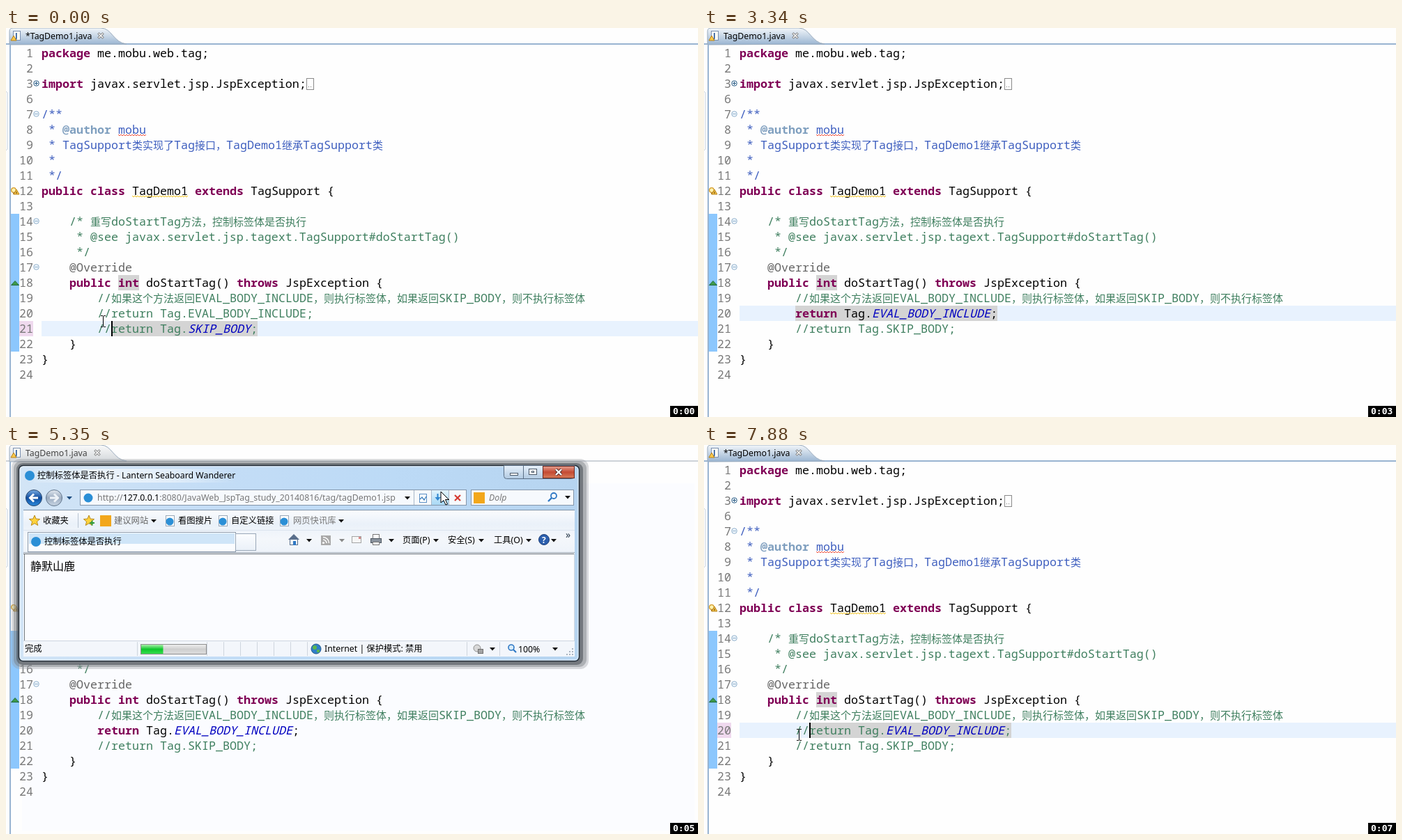
Write an HTML page with a canvas that moves like this. It is 993x559 px and loops after 8 s.

```html
<!DOCTYPE html>
<html lang="zh">
<head>
<meta charset="utf-8">
<title>TagDemo1</title>
<style>
html, body { margin: 0; width: 100%; height: 100%; overflow: hidden; background: #fefefe; }
canvas { display: block; }
</style>
</head>
<body>
<canvas id="stage" width="993" height="559"></canvas>
<script>
const c = document.getElementById('stage').getContext('2d');
const UI = '"Noto Sans", "Noto Sans CJK SC", sans-serif';
const MONO = '"Noto Sans Mono", monospace';
const CJK = '"Noto Sans CJK SC", "Noto Sans CJK", sans-serif';

// style letter -> [colour, font prefix]
const STYLES = {
  k: ['#7f0055', 'bold '], n: ['#000', ''], j: ['#3f5fbf', ''], t: ['#7f9fbf', 'bold '],
  g: ['#3f7f5f', ''], a: ['#646464', ''], i: ['#0000c0', 'italic ']
};
// each segment starts with its style letter
const LINES = {
  1: 'kpackage|n me.mobu.web.tag;',
  2: '',
  3: 'kimport|n javax.servlet.jsp.JspException;',
  6: '',
  7: 'j/**',
  8: 'j * |t@author|j mobu',
  9: 'j * TagSupport类实现了Tag接口，TagDemo1继承TagSupport类',
  10: 'j *',
  11: 'j */',
  12: 'kpublic class|n TagDemo1 |kextends|n TagSupport {',
  13: '',
  14: 'g    /* 重写doStartTag方法，控制标签体是否执行',
  15: 'g     * @see javax.servlet.jsp.tagext.TagSupport#doStartTag()',
  16: 'g     */',
  17: 'a    @Override',
  18: 'k    public int|n doStartTag() |kthrows|n JspException {',
  19: 'g        //如果这个方法返回EVAL_BODY_INCLUDE，则执行标签体，如果返回SKIP_BODY，则不执行标签体',
  22: 'n    }',
  23: 'n}',
  24: ''
};

const rowTop = n => 25 + 22 * (n > 3 ? n - 3 : n - 1);
const within = (t, a, b) => t >= a && t < b;
// value of the last [time, value] entry already reached
const at = (t, steps) => steps.filter(s => s[0] <= t).pop()[1];

function box(x, y, w, h, fill, line) {
  if (fill) { c.fillStyle = fill; c.fillRect(x, y, w, h); }
  if (line) { c.strokeStyle = line; c.lineWidth = 1; c.strokeRect(x + .5, y + .5, w - 1, h - 1); }
}
function round(x, y, w, h, r, fill, line, width = 1) {
  c.beginPath();
  c.roundRect(x, y, w, h, r);
  if (fill) { c.fillStyle = fill; c.fill(); }
  if (line) { c.strokeStyle = line; c.lineWidth = width; c.stroke(); }
}
function poly(pts, fill, line, width = 1) {
  c.beginPath();
  for (let i = 0; i < pts.length; i += 2) c.lineTo(pts[i], pts[i + 1]);
  if (fill) { c.closePath(); c.fillStyle = fill; c.fill(); }
  if (line) { c.strokeStyle = line; c.lineWidth = width; c.stroke(); }
}
function disc(x, y, r, fill, line, width = 1) {
  c.beginPath();
  c.arc(x, y, r, 0, 7);
  if (fill) { c.fillStyle = fill; c.fill(); }
  if (line) { c.strokeStyle = line; c.lineWidth = width; c.stroke(); }
}
function fade(x0, y0, x1, y1, ...colors) {
  const g = c.createLinearGradient(x0, y0, x1, y1);
  colors.forEach((col, i) => g.addColorStop(i / (colors.length - 1), col));
  return g;
}
function label(str, x, y, fill = '#000', font = '12.3px ' + UI) {
  c.font = font;
  c.fillStyle = fill;
  c.fillText(str, x, y);
}
const down = (x, y, col = '#111') => poly([x - 4, y - 2, x + 4, y - 2, x, y + 2.5], col);
function cross(x, y, r, col, width) {
  poly([x - r, y - r, x + r, y + r], null, col, width);
  poly([x - r, y + r, x + r, y - r], null, col, width);
}
function squiggle(x0, x1, y, col) {
  const pts = [];
  for (let x = x0; x <= x1; x += 2) pts.push(x, y + (x - x0) % 4);
  poly(pts, null, col);
}
function star(x, y, r) {
  const pts = [];
  for (let i = 0; i < 10; i++) {
    const a = i * Math.PI / 5, d = i % 2 ? r * .45 : r;
    pts.push(x + d * Math.sin(a), y - d * Math.cos(a));
  }
  poly(pts, '#ffd23c');
  poly([...pts, pts[0], pts[1]], null, '#b98a1a');
}

function codeLine(n, text) {
  let x = 51;
  if (!text) return;
  for (const seg of text.split('|')) {
    const [col, prefix] = STYLES[seg[0]];
    for (const part of seg.slice(1).match(/[\u3000-\uffff]+|[^\u3000-\uffff]+/g) || []) {
      const wide = part[0] >= '\u3000';
      label(part, x, rowTop(n) + 17, col, prefix + (wide ? '15px ' + CJK : '16.667px ' + MONO));
      x += part.length * (wide ? 15 : 10);
    }
  }
}

function bulb(y, error) {
  disc(11, y - 1, 3.3, '#fff3b0', '#d49a28', 1.3);
  box(10, y + 2, 3, 3, '#b98a3c');
  if (error) {
    box(12, y - 3, 7, 8, '#e0343c');
    cross(15.5, y + 1, 1.8, '#fff', 1.2);
  } else {
    poly([15, y - 2, 19, y + 5, 11, y + 5], '#fbc94a', '#b5811c');
    box(14.5, y + 1, 1, 3, '#5a3c00');
  }
}

function tab(active, dirty) {
  box(0, 22, 993, 2, active ? '#99b4d1' : '#cdd2d8');
  c.beginPath();
  c.moveTo(5, 24);
  c.lineTo(5, 5);
  c.quadraticCurveTo(5, 0, 10, 0);
  c.lineTo(136, 0);
  c.bezierCurveTo(152, 0, 154, 21, 173, 23);
  c.closePath();
  c.fillStyle = active ? fade(0, 0, 0, 24, '#f2f6fa', '#99b4d1') : fade(0, 0, 0, 24, '#fafafa', '#d2d6da');
  c.fill();
  c.strokeStyle = '#9aabbd';
  c.lineWidth = 1;
  c.stroke();
  box(5, 24, 2, 535, '#99b4d1');
  box(10, 4, 11, 14, '#fdfdf6', '#7a8fb0');
  label('J', 13, 15, '#2a5a9c', 'bold 11px ' + UI);
  poly([11, 11, 15, 18, 7, 18], '#fbc94a', '#b5811c');
  label((dirty ? '*' : '') + 'TagDemo1.java', 28, 16, active ? '#000' : '#444');
  const x = dirty ? 136 : 131;
  cross(x, 11, 3.6, '#777', 3.2);
  cross(x, 11, 3.2, '#fff', 1.4);
}

function editor(t, browsing) {
  const prefix = at(t, [[0, '//'], [2040, '/'], [2140, ''], [7340, '/'], [7480, '//']]);
  const row = at(t, [[0, 21], [250, 20], [4900, 0], [6400, 18], [7090, 20]]);
  const broken = within(t, 820, 2540);
  const marked = within(t, 2690, 3740) || t >= 7220;
  const left = 131 + 10 * prefix.length;

  box(0, 0, 993, 559, '#fefefe');
  if (within(t, 4900, 6400)) box(23, 55, 965, 499, '#fbfcff');
  tab(!browsing, t < 2540 || t >= 7340);
  poly([0, 91, 2, 93, 2, 174, 0, 176], null, '#c8d2dc');
  box(7, 267, 12, 198, '#8cc7fd');

  if (row) box(51, rowTop(row), 942, 22, '#e8f2fe');
  if (t < 3090) box(19, 421, 20, 22, '#efd9ee');
  if (within(t, 2040, 3090) || t >= 7340) box(19, 399, 20, 22, '#efd9ee');
  const gray = (n, x, w) => box(x, rowTop(n), w, 22, '#d4d4d4');
  if (t < 820 || marked) gray(18, 161, 30);
  if (t < 250) gray(21, 151, 210);
  if (marked) gray(20, left, 290);
  if (within(t, 6550, 7220)) gray(18, 201, 100);

  const comment = t < 2040 || t >= 7480;
  const word = comment ? 'g' : 'k', plain = comment ? 'g' : 'n';
  const constant = at(t, [[0, 'g'], [2040, 'n'], [2690, 'i']]);
  const all = {
    ...LINES,
    20: `${plain}        ${prefix}|${word}return|${plain} Tag.|${constant}EVAL_BODY_INCLUDE|${plain};`,
    21: `g        //return Tag.|${t < 250 ? 'i' : 'g'}SKIP_BODY|g;`
  };
  for (const n in all) {
    label(n, 39 - 10 * n.length, rowTop(+n) + 17, '#787878', '16.667px ' + MONO);
    codeLine(+n, all[n]);
  }

  for (const n of [3, 7, 14, 17]) {
    const y = rowTop(n) + 10.5, col = n == 3 ? '#2f5f86' : '#8fb0cc';
    disc(43.5, y, 3.8, '#eef5fb', col);
    box(41, y - .5, 5, 1, col);
    if (n == 3) box(43, y - 2.5, 1, 5, col);
  }
  box(431, 72, 11, 17, null, '#8a8a8a');
  box(434, 84, 1, 1, '#777');
  box(437, 84, 1, 1, '#777');

  squiggle(161, 201, 153, '#f0523c');
  squiggle(181, 261, 241, '#f0c21e');
  bulb(234);
  if (broken) {
    bulb(80);
    bulb(366, true);
    squiggle(201, 521, 373, '#e0308a');
  } else {
    poly([7.5, 369.5, 13, 363.5, 18.5, 369.5], '#3f9a4c', '#1f6a38');
  }

  const caret = at(t, [[0, 1], [250, 0], [540, 1], [1060, 0], [1490, 1], [2540, 0], [2970, 1], [3340, 0], [7220, 1]]);
  if (caret) box(row == 21 ? 151 : left, rowTop(row), 2, 22, '#000');
}

function frame() {
  // soft outer edge, then the dark core of the shadow
  round(8, 20, 828, 302, 12, 'rgba(150,153,158,.35)');
  round(11, 23, 822, 296, 11, 'rgba(120,124,130,.45)');
  round(15, 26, 813, 290, 9, 'rgba(70,75,82,.55)');
  round(18, 29, 805, 282, 7, fade(18, 29, 823, 90, '#d3e5f6', '#c4ddf6', '#bcdaf6', '#b6d4f0'));
  round(18.5, 29.5, 804, 281, 6, null, '#232c36', 1.6);
  round(20, 31, 801, 278, 5, null, 'rgba(255,255,255,.7)');

  box(40, 34, 290, 20, fade(40, 0, 330, 0, 'rgba(255,255,255,.1)', 'rgba(255,255,255,.6)', 'rgba(255,255,255,.5)', 'rgba(255,255,255,0)'));
  disc(34, 44, 7, '#2b8fd6');
  label('控制标签体是否执行 - Lantern Seaboard Wanderer', 45, 48);

  round(714.5, 29.5, 101, 19, [0, 0, 4, 4], fade(0, 30, 0, 48, '#e6f0fa', '#b3cbe2'), '#5b6f85');
  box(770, 30, 46, 18, fade(0, 30, 0, 48, '#e8a596', '#c44a33', '#d9805c'), '#6b2b22');
  box(742, 30, 1, 18, '#5b6f85');
  box(723, 40, 12, 4, '#fff', '#4a5868');
  box(750, 34, 12, 9, '#fff', '#4a5868');
  box(754, 37, 4, 3, null, '#4a5868');
  cross(793, 39, 4, '#4a2a2a', 4);
  cross(793, 39, 4, '#fff', 2.4);
}

function addressRow(hover) {
  disc(40, 76, 11.5, fade(0, 64, 0, 88, '#7fb2e6', '#0f4c9e', '#2f8fe0'), '#28456b');
  poly([46, 76, 35, 76], null, '#fff', 3);
  poly([40, 70.5, 34.5, 76, 40, 81.5], null, '#fff', 3);
  disc(69, 76, 11.5, fade(0, 64, 0, 88, '#e6ecf2', '#9aabc0', '#cbd8e6'), '#60758c');
  poly([63, 76, 74, 76], null, '#eef3f8', 3);
  poly([69, 70.5, 74.5, 76, 69, 81.5], null, '#eef3f8', 3);
  down(91, 76, '#1d4d80');

  box(106, 64, 555, 23, '#f6f9fd', '#8496aa');
  for (const x of [585, 610, 635]) box(x, 65, 1, 21, '#a9b8c8');
  disc(118, 76, 6.5, '#2b8fd6');
  let x = 131;
  [['http://', '#777'], ['127.0.0.1', '#000'], [':8080/JavaWeb_JspTag_study_20140816/tag/tagDemo1.jsp', '#777']].forEach(([s, col]) => {
    label(s, x, 80, col, '12.38px ' + UI);
    x += c.measureText(s).width;
  });
  down(576, 76);
  box(593, 70, 11, 13, '#fff', '#5b8fc4');
  poly([594, 78, 597, 75, 600, 79, 603, 74], null, '#3f80bd', 1.3);
  if (hover) box(611, 65, 24, 21, fade(0, 65, 0, 86, '#e2f3fd', '#a8d8f5'));
  // paired arrows: one down on the left, one up on the right
  poly([619.5, 70, 619.5, 77], null, '#2f86cf', 2);
  poly([615.5, 75, 619.5, 80, 623.5, 75], '#2f86cf');
  poly([626.5, 75, 626.5, 82], null, '#2f86cf', 2);
  poly([622.5, 76, 626.5, 71, 630.5, 76], '#2f86cf');
  cross(648, 76, 4, '#d63a30', 2.2);

  box(667, 64, 148, 23, '#f6f9fd', '#8496aa');
  box(671, 68, 16, 16, '#f2a71b');
  label('Dolp', 693, 80, '#777', 'italic 12.3px ' + UI);
  disc(786, 73, 4, null, '#2f78c4', 1.8);
  poly([783, 76, 778, 81], null, '#2f78c4', 2.4);
  down(806, 75);
}

function toolbars() {
  box(25, 93, 791, 62, fade(0, 93, 0, 155, '#fbfcfe', '#eaf1f9', '#f4f7fb', '#eef3fa'));
  box(25, 93, 791, 1, '#7f93a8');
  box(25, 122, 791, 1, '#dbe4ee');
  star(41, 109, 8);
  label('收藏夹', 53, 113);
  box(103, 98, 1, 21, '#b8c4d2');
  star(119, 109, 8);
  box(120, 111, 7, 2, '#2f9a3c');
  box(122.5, 108.5, 2, 7, '#2f9a3c');
  box(135, 101, 16, 16, '#f2a71b');
  label('建议网站', 155, 113, '#666');
  down(212, 109);
  for (const x of [235, 311, 399]) {
    box(x - 6, 101, 13, 16, '#fff', '#9aa8b8');
    disc(x, 110, 5.5, '#2b8fd6');
  }
  label('看图搜片', 247, 113);
  label('自定义链接', 323, 113);
  label('网页快讯库', 412, 113, '#777');
  down(481, 109);

  box(31, 125, 299, 29, '#fafcff', '#8e9cad');
  box(33, 127, 295, 15, '#cfe5f8');
  box(329, 127, 30, 25, fade(0, 127, 0, 152, '#fcfdff', '#e9f0f8'), '#9aa8b8');
  disc(43, 139, 7, '#2b8fd6');
  label('控制标签体是否执行', 55, 143);

  poly([405, 136, 413, 128, 421, 136], '#5a6f8c');
  box(407, 135, 12, 9, '#eef3f8', '#5a6f8c');
  box(412, 138, 4, 6, '#2f78c4');
  box(452, 130, 14, 14, '#a9a9a9');
  disc(455.5, 140.5, 1.6, '#fff');
  for (const r of [5, 8.5]) {
    c.beginPath();
    c.arc(455, 141, r, -Math.PI / 2, 0);
    c.strokeStyle = '#fff';
    c.lineWidth = 1.5;
    c.stroke();
  }
  box(496, 131, 14, 10, '#f6f6f6', '#a4a4a4');
  box(506, 132, 3, 3, '#d98a8a');
  box(526, 128, 10, 8, '#fff', '#777');
  box(523, 134, 16, 7, '#8a939e', '#4c5660');
  box(526, 139, 10, 5, '#fff', '#777');
  label('页面(P)', 569, 141);
  label('安全(S)', 634, 141);
  label('工具(O)', 700, 141);
  disc(772, 136, 7.5, '#2b5fae', '#1e3f78');
  label('?', 769, 141, '#fff', 'bold 12px ' + UI);
  for (const x of [435, 553, 617, 682, 750, 786]) down(x, 137);
  down(482, 137, '#888');
  label('»', 803, 134, '#234', '14px ' + UI);
}

function browser(t) {
  const loading = within(t, 5090, 5600);
  frame();
  addressRow(within(t, 4780, 6050));
  toolbars();

  box(25, 154, 791, 128, t < 4010 ? '#f7f8fd' : '#fbfcff');
  box(25, 154, 791, 1, '#9aa5b1');
  box(25, 156, 791, 1, '#5f6972');
  box(26, 156, 1, 125, '#70787f');
  box(815, 156, 1, 125, '#d5dbe2');
  if (t >= 5220) label('静默山鹿', 35, 180, '#000', '16px ' + CJK);

  box(25, 281, 791, 23, '#f3f6fb');
  box(25, 281, 791, 1, '#cdd5df');
  for (const x of [288, 312, 336, 360, 384, 408, 432, 661, 708]) box(x, 283, 1, 20, '#ced5de');
  label('完成', 27, 297);
  if (loading) {
    box(188, 283, 1, 20, '#ced5de');
    box(193, 286, 95, 15, fade(0, 286, 0, 301, '#f2f2f2', '#cfcfcf', '#dedede'), '#8f8f8f');
    const w = Math.min(92, 8 + (t - 5090) * .09);
    box(194, 287, w, 13, fade(0, 287, 0, 300, '#a8f0a8', '#0fc62c', '#35dd4c'));
  }
  disc(445, 293, 7, '#2f7fc9', '#235a8c');
  disc(443, 291, 3, '#5cb84e');
  disc(448, 296, 2.2, '#5cb84e');
  label('Internet | 保护模式: 禁用', 457, 297);
  disc(676, 292, 5, '#d8d8d8', '#909090');
  box(677, 293, 8, 7, '#a4a4a4', '#707070');
  down(698, 293);
  disc(725, 291, 4, '#d8ecfa', '#2f78c4', 1.6);
  poly([728, 294, 732, 298], null, '#2f78c4', 2.2);
  label('100%', 735, 298);
  down(788, 293);
  for (let i = 0; i < 3; i++)
    for (let j = 0; j <= i; j++) box(812 - j * 4, 292 + i * 4, 2, 2, '#aab4c0');
}

// [time, x, y]
const PATH = [
  [0, 139, 421], [120, 139, 421], [400, 155, 408], [2040, 155, 408],
  [4010, 560, 330], [4130, 560, 330], [4680, 632, 92], [4840, 624, 67], [5980, 624, 67],
  [6300, 270, 366], [6500, 255, 366], [6820, 131, 418], [7090, 131, 418], [7340, 136, 416], [8000, 136, 416]
];
function pointer(t, browsing) {
  if (within(t, 2040, 4010)) return;
  const i = PATH.findIndex(p => p[0] > t), a = PATH[i - 1], b = PATH[i];
  const k = (t - a[0]) / (b[0] - a[0]), e = k * k * (3 - 2 * k);
  const x = Math.round(a[1] + (b[1] - a[1]) * e), y = Math.round(a[2] + (b[2] - a[2]) * e);
  if (browsing && y < 311) {
    poly([x, y, x, y + 16, x + 4, y + 12.5, x + 7, y + 19, x + 9.5, y + 18, x + 6.5, y + 11.5, x + 11.5, y + 11.5], '#fff', '#000');
    poly([x, y, x + 11.5, y + 11.5], null, '#000');
  } else {
    box(x, y - 7, 1, 15, '#000');
    for (const yy of [y - 8, y + 8]) {
      box(x - 3, yy, 3, 1, '#000');
      box(x + 1, yy, 3, 1, '#000');
    }
  }
}

function draw(t) {
  const browsing = within(t, 3740, 6400);
  editor(t, browsing);
  if (browsing) {
    c.globalAlpha = t < 3860 ? .55 : 1;
    browser(t);
    c.globalAlpha = 1;
  }
  pointer(t, browsing);
  const seconds = [1060, 2040, 2970, 3980, 4980, 5980, 6970].filter(s => s <= t).length;
  box(953, 543, 40, 16, '#000');
  label('0:0' + seconds, 957, 555, '#fff', 'bold 13px "DejaVu Sans Mono", monospace');
}

const start = performance.now();
function tick() {
  draw((performance.now() - start) % 8000);
  requestAnimationFrame(tick);
}
tick();
</script>
</body>
</html>
```
